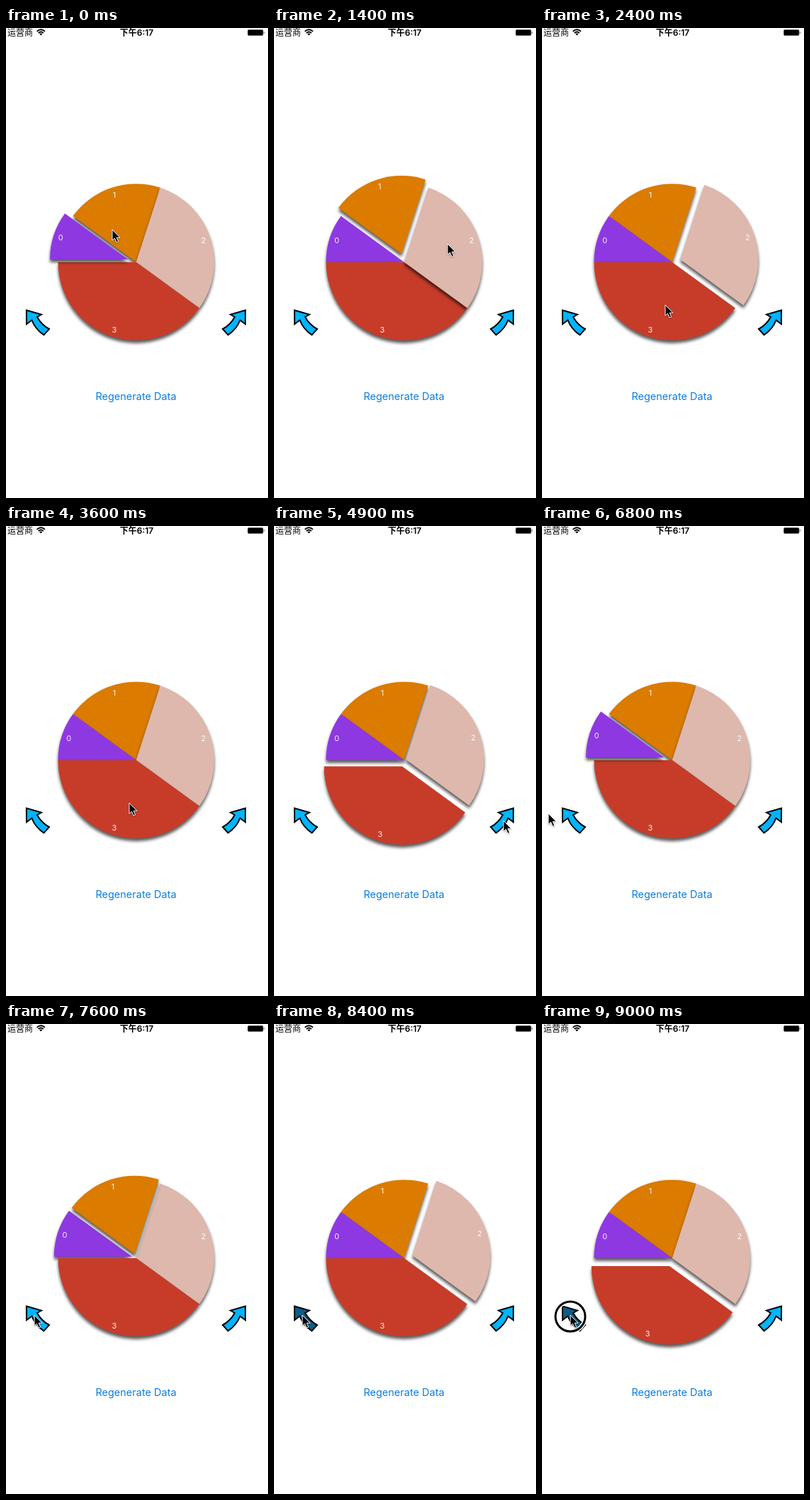
Recreate the animation shown at these times as an HTML page. Size 370 px wide and 662 px high, loop 9100 ms.

```html
<!DOCTYPE html>
<html lang="en">
<head>
<meta charset="utf-8">
<title>Pie chart</title>
<style>
  html, body { margin: 0; width: 100%; height: 100%; overflow: hidden; background: #fff; }
  svg { display: block; width: 370px; height: 662px; }
  text { font-family: Inter, "Noto Sans CJK SC", "Noto Sans CJK", sans-serif; }
  .status { font-size: 12px; }
  .slice path { filter: drop-shadow(0 4px 2.2px rgba(0, 0, 0, .65)); }
  .slice text { font-size: 11px; fill: #fff; fill-opacity: .92; text-anchor: middle; }
  .arrow { fill: #00b4ff; stroke: #000; stroke-width: 2; }
  .arrow.down { fill: #0b5d85; }
  .ring { fill: none; }
  #cursor path { stroke: #fff; stroke-width: 1; filter: drop-shadow(0 1px 1px rgba(0, 0, 0, .35)); }
</style>
</head>
<body>
<svg viewBox="0 0 370 662">
  <text class="status" x="2" y="11">运营商</text>
  <g fill="none" stroke="#000" stroke-width="1.9">
    <path d="M43.6 4.9Q49.3 -.5 55 4.9M45.7 7.1Q49.3 3.9 52.9 7.1"/>
    <path d="M47.2 8.3Q49.3 6.5 51.4 8.3L49.3 10.5z" fill="#000" stroke="none"/>
  </g>
  <text class="status" x="184.5" y="11" text-anchor="middle" font-weight="600">下午6:17</text>
  <rect x="341.5" y="2.5" width="21.5" height="8" rx="1.5" fill="#000" stroke="#555" stroke-width=".8"/>
  <path d="M364.3 4.7q1.6 1.8 0 3.6z"/>

  <g id="pie"></g>

  <path id="left" class="arrow" d="M28.9 397.5L50 403.5L44 407Q50 418 61 424L53.5 432.3Q41 424 36.5 411.5L29 417z"/>
  <path id="right" class="arrow" transform="matrix(-1 0 0 1 367 0)" d="M28.9 397.5L50 403.5L44 407Q50 418 61 424L53.5 432.3Q41 424 36.5 411.5L29 417z"/>
  <text x="183.5" y="524" text-anchor="middle" font-size="14.5" fill="#0a7ddf">Regenerate Data</text>

  <g id="cursor">
    <g id="ring" class="ring">
      <circle cy="2" r="21" stroke="#fff" stroke-width="6"/>
      <circle cy="2" r="21" stroke="#000" stroke-width="3"/>
    </g>
    <path d="M0 0V15.3L3.5 12.1L6.1 18L8.7 16.9L6.2 11.2H11z"/>
  </g>
</svg>
<script>
const LOOP = 9100, MOVE = 300, POP = 12;
const CX = 183.8, CY = 329.7, R = 110.3, LABEL_R = 100;
const $ = id => document.getElementById(id);
const rad = deg => deg * Math.PI / 180;
const polar = (r, deg) => [r * Math.cos(rad(deg)), r * Math.sin(rad(deg))];
const ease = p => { p = Math.min(1, Math.max(0, p)); return p * p * (3 - 2 * p); };

// start angle, sweep, colour
const slices = [
  [180, 36, '#8e38e2'],
  [216, 72, '#db7b00'],
  [288, 108, '#deb8ad'],
  [36, 144, '#c73c29']
].map(([start, sweep, color], i) => {
  const mid = start + sweep / 2;
  const a = polar(R, start), b = polar(R, start + sweep), [x, y] = polar(LABEL_R, mid);
  $('pie').insertAdjacentHTML('beforeend',
    `<g class="slice"><path fill="${color}" d="M0 0L${a}A${R} ${R} 0 0 1 ${b}z"/>` +
    `<text x="${x}" y="${y + 4}">${i}</text></g>`);
  return { mid, el: $('pie').lastChild };
});

// release time, slice that pops out (-1: none), pressed button
const clicks = [
  [-MOVE, 0], [500, 1], [1390, 2], [2400, 3], [3250, -1], [3800, 3],
  [4810, 2, 'right'], [5400, 1, 'right'], [5980, 0, 'right'],
  [7450, 1, 'left'], [8000, 2, 'left'], [8580, 3, 'left'], [9080, 0, 'left']
];

// leave time, arrive time, x, y
const path = [
  [0, 0, 150, 284], [650, 1250, 245, 304], [1750, 2250, 174, 390],
  [4050, 4550, 324, 415], [6120, 6700, 9, 405], [7000, 7250, 40, 410]
];

function cursorAt(t) {
  let [, , x, y] = path[0];
  for (const [from, to, nx, ny] of path.slice(1)) {
    const p = ease((t - from) / (to - from));
    x += (nx - x) * p;
    y += (ny - y) * p;
  }
  return [x, y];
}

let front = null;
function stack(selected) {
  if (selected === front) return;
  front = selected;
  const order = [1, 2, 0, 3].filter(i => i !== selected);
  if (selected >= 0) order.push(selected);
  order.forEach(i => $('pie').append(slices[i].el));
}

function draw(t) {
  const n = clicks.findLastIndex(c => c[0] <= t);
  const [since, selected] = clicks[n];
  const previous = n ? clicks[n - 1][1] : selected;
  const p = ease((t - since) / MOVE);

  stack(selected);
  slices.forEach(({ mid, el }, i) => {
    const out = (i === selected ? p : 0) + (i === previous && n ? 1 - p : 0);
    const [dx, dy] = polar(POP * Math.min(1, out), mid);
    el.setAttribute('transform', `translate(${CX + dx} ${CY + dy})`);
  });

  const next = clicks[n + 1];
  const wait = next ? next[0] - t : Infinity;
  for (const side of ['left', 'right'])
    $(side).classList.toggle('down', wait <= 180 && next[2] === side);
  $('ring').style.display = wait <= 140 ? '' : 'none';
  $('cursor').setAttribute('transform', `translate(${cursorAt(t)})`);
}

const begin = performance.now();
function tick() {
  draw((performance.now() - begin) % LOOP);
  requestAnimationFrame(tick);
}
tick();
</script>
</body>
</html>
```
